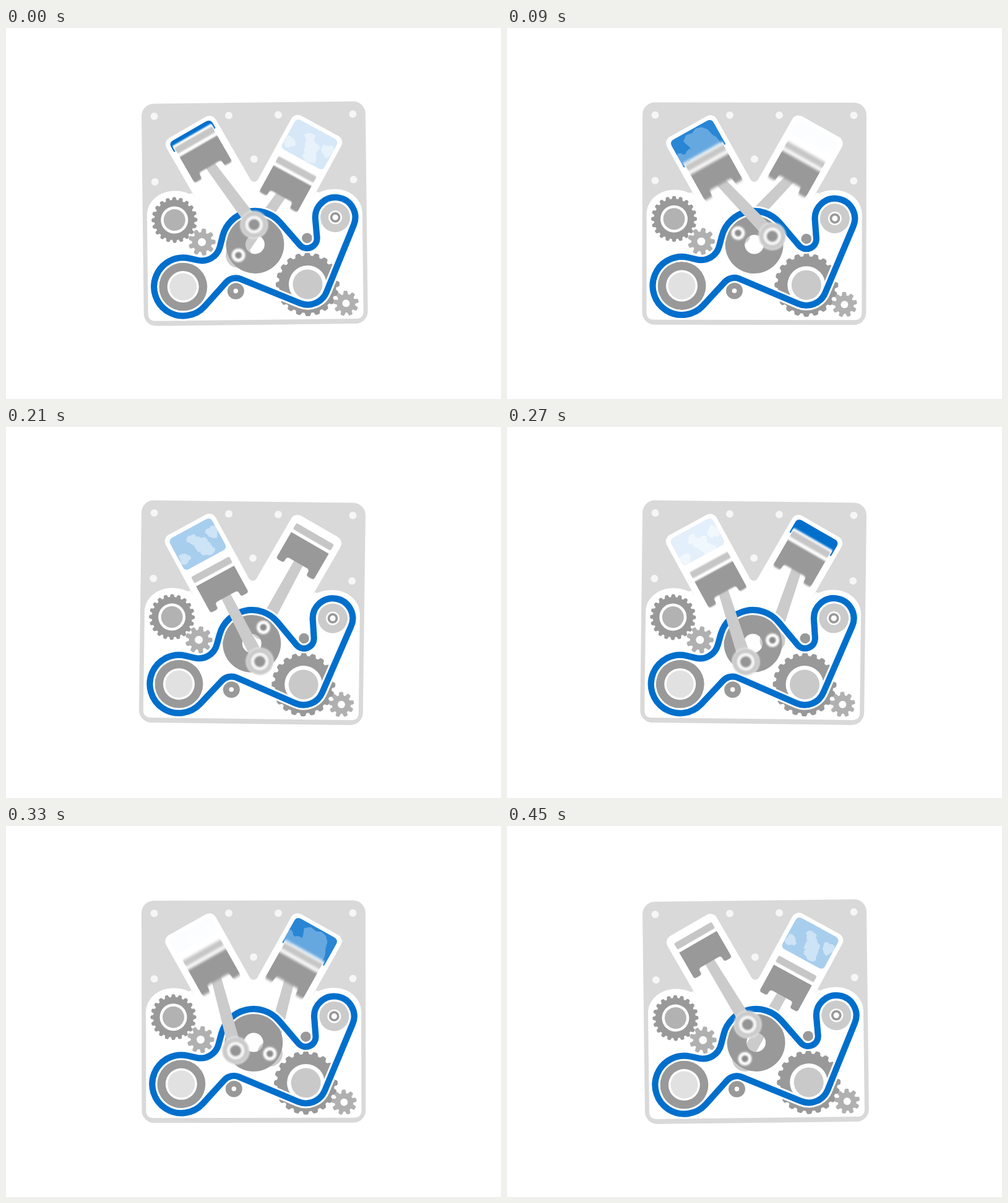
Recreate the animation shown at these times as an HTML page. Size 800 px wide and 600 px high, loop 0.48 s.

```html
<!DOCTYPE html>
<html lang="en">
<head>
<meta charset="utf-8">
<title>Engine</title>
<style>
html, body { margin: 0; width: 100%; height: 100%; overflow: hidden; background: #fff; }
svg { display: block; width: 800px; height: 600px; }
</style>
</head>
<body>
<svg viewBox="0 0 800 600" xmlns="http://www.w3.org/2000/svg">
  <defs>
    <filter id="blurL" filterUnits="userSpaceOnUse" x="-60" y="-20" width="120" height="110"><feGaussianBlur stdDeviation="0 1"/></filter>
    <filter id="blurR" filterUnits="userSpaceOnUse" x="-60" y="-20" width="120" height="110"><feGaussianBlur stdDeviation="0 1"/></filter>
    <filter id="soft" filterUnits="userSpaceOnUse" x="-40" y="-40" width="80" height="80"><feGaussianBlur stdDeviation="1.3"/></filter>
    <clipPath id="clipL"><path/></clipPath>
    <clipPath id="clipR"><path/></clipPath>
    <g id="piston">
      <rect x="-36.5" y="-3" width="73" height="21" rx="2" fill="#fff"/>
      <rect x="-35" y="1" width="70" height="11.5" rx="2" fill="#c6c6c6"/>
      <path fill="#999" d="M-35 18H35V63Q35 67 31 67H25Q21 67 21 63V61Q21 56 16 56H-16Q-21 56 -21 61V63Q-21 67 -25 67H-31Q-35 67 -35 63Z"/>
    </g>
    <path id="shoulder" d="M226 310V301C226 279 246 262 270 262C281 262 288 264 293.5 266.5Q297 268 299 265.5L330 310Z"/>
  </defs>
  <g id="engine">
    <rect x="219" y="120.5" width="362" height="359.5" rx="20" fill="#d9d9d9"/>
    <g id="holes" fill="#f6f6f6"></g>
    <g fill="#fff">
      <use href="#shoulder"/>
      <use href="#shoulder" transform="matrix(-1 0 0 1 800 0)"/>
      <path d="M226 300H574V460Q574 472 562 472H238Q226 472 226 460Z"/>
      <rect x="-46" y="-218.5" width="92" height="180" rx="12" transform="translate(400 350) rotate(-29.3)"/>
      <rect x="-46" y="-218.5" width="92" height="180" rx="12" transform="translate(400 350) rotate(29.3)"/>
      <rect x="393.9" y="245.1" width="12.2" height="28"/>
      <circle cx="400" cy="241.7" r="7" fill="#d9d9d9"/>
    </g>
    <g id="gears"></g>
    <g id="wheels"></g>
    <g id="rodR" fill="#cbcbcb"><path/><circle r="20.5"/></g>
    <path fill="#999" fill-rule="evenodd" d="M353 350a47 47 0 1 0 94 0a47 47 0 1 0 -94 0M384.5 350a15.5 15.5 0 1 0 31 0a15.5 15.5 0 1 0 -31 0"/>
    <g id="pinR">
      <g filter="url(#soft)">
        <circle r="11.5" fill="#d6d6d6"/>
        <circle r="8" fill="none" stroke="#fff" stroke-width="4"/>
        <circle r="5.5" fill="#8c8c8c"/>
      </g>
    </g>
    <path id="edge" fill="none" stroke="#fff" stroke-width="16"/>
    <path id="belt" fill="none" stroke="#006fcc" stroke-width="10.2"/>
    <g id="rodL" fill="#cbcbcb"><path/></g>
    <g id="pinL">
      <g filter="url(#soft)">
        <circle r="22" fill="#cbcbcb" stroke="#fff" stroke-opacity=".45" stroke-width="2"/>
        <circle r="12.5" fill="#eee" stroke="#f8f8f8" stroke-width="3"/>
        <circle r="9" fill="#959595"/>
      </g>
    </g>
    <g transform="translate(400 350) rotate(-29.3)">
      <g id="gasL" clip-path="url(#clipL)"><path fill="#006fcc" d="M-40-214h80v180h-80z"/><path fill="#fff"/></g>
      <g id="headL"><use href="#piston" filter="url(#blurL)"/></g>
    </g>
    <g transform="translate(400 350) rotate(29.3)">
      <g id="gasR" clip-path="url(#clipR)"><path fill="#006fcc" d="M-40-214h80v180h-80z"/><path fill="#fff"/></g>
      <g id="headR"><use href="#piston" filter="url(#blurR)"/></g>
    </g>
  </g>
</svg>
<script>
const LOOP = 480, STEP = 30, RAD = Math.PI / 180;
const CX = 400, CY = 350, CRANK = 32, ROD = 129, WRIST = 45, LEAN = 29.3;
const $ = s => document.querySelector(s);
const mod = (a, n) => ((a % n) + n) % n;
const clamp = (v, a = 0, b = 1) => Math.min(b, Math.max(a, v));
const set = (el, attrs) => { for (const k in attrs) el.setAttribute(k, attrs[k]); };

function add(parent, tag, attrs) {
  const el = document.createElementNS('http://www.w3.org/2000/svg', tag);
  set(el, attrs);
  return parent.appendChild(el);
}
const disc = (parent, cx, cy, r, fill) => add(parent, 'circle', { cx, cy, r, fill });

for (const [x, y] of [[239.5, 141], [360, 141], [440, 141], [560.5, 141], [400, 212], [239.5, 247], [560.5, 247]])
  add($('#holes'), 'circle', { cx: x, cy: y, r: 6 });

// Toothed wheel outline centred on the origin
function teeth(n, root, tip) {
  const pts = [];
  for (let i = 0; i < n; i++)
    for (const [f, r] of [[-.37, root], [-.24, tip - 1], [-.15, tip], [.15, tip], [.24, tip - 1], [.37, root]]) {
      const a = (i + f) * 2 * Math.PI / n;
      pts.push((r * Math.cos(a)).toFixed(2) + ' ' + (r * Math.sin(a)).toFixed(2));
    }
  return 'M' + pts.join('L') + 'Z';
}

for (const [x, y, n, root, tip, fill, turn] of [
  [270.3, 309, 20, 32.5, 37, '#999', 0],
  [314.3, 345.3, 9, 16, 22, '#b0b0b0', 0],
  [484.3, 415.5, 20, 46.5, 51.5, '#999', 0],
  [546, 447, 9, 15, 20.5, '#b0b0b0', -12]
]) add($('#gears'), 'path', { d: teeth(n, root, tip), fill, transform: `translate(${x} ${y}) rotate(${turn})` });

[
  [270.3, 309, 22, '#fff'], [270.3, 309, 17.5, '#b2b2b2'],
  [314.3, 345.3, 6.5, '#fff'],
  [484.3, 415.5, 30.5, '#fff'], [484.3, 415.5, 24, '#c9c9c9'],
  [546, 447, 6, '#fff'],
  [283, 417.2, 39, '#999'], [283, 417.2, 25.5, '#fff'], [283, 417.2, 22, '#e1e1e1'],
  [530.2, 307.8, 24, '#cbcbcb'], [530.2, 307.8, 11, '#fff'], [530.2, 307.8, 8.4, '#999'], [530.2, 307.8, 4.6, '#fff'],
  [484.3, 341, 8.5, '#999'],
  [368, 425, 13.5, '#999'], [368, 425, 3.8, '#fff']
].forEach(c => disc($('#wheels'), ...c));

// Belt: tangent lines between wheels; a negative radius wraps the other way round
function beltPath(ws) {
  const m = ws.length, out = [], into = [];
  ws.forEach(([x, y, s], i) => {
    const j = (i + 1) % m, [X, Y, S] = ws[j];
    const dx = X - x, dy = Y - y;
    const nu = Math.atan2(dy, dx) - Math.acos(clamp((s - S) / Math.hypot(dx, dy), -1, 1));
    const at = (cx, cy, r) => ({ x: cx + r * Math.cos(nu), y: cy + r * Math.sin(nu), a: nu });
    out[i] = at(x, y, s);
    into[j] = at(X, Y, S);
  });
  let d = `M${into[0].x} ${into[0].y}`;
  ws.forEach(([, , s], i) => {
    const span = mod((out[i].a - into[i].a) * Math.sign(s), 2 * Math.PI);
    const r = Math.abs(s), next = into[(i + 1) % m];
    d += `A${r} ${r} 0 ${span > Math.PI ? 1 : 0} ${s > 0 ? 1 : 0} ${out[i].x} ${out[i].y}L${next.x} ${next.y}`;
  });
  return d + 'Z';
}
const route = beltPath([
  [283, 417.2, 47], [314.3, 345.3, -30], [400, 350, 54], [484.3, 341, -16],
  [530.2, 307.8, 32.3], [484.3, 415.5, 33], [368, 425, -21]
]);
set($('#belt'), { d: route });
set($('#edge'), { d: route });

// Sway of the block, evenly spaced keys starting at 30 ms
const sway = [.75, -.15, -.85, -1.05, -.97, .1, .65, 1];
function swayAt(t) {
  const u = mod(t - 30, LOOP) / 60, i = Math.floor(u), f = u - i;
  const [a, b, c, d] = [-1, 0, 1, 2].map(k => sway[mod(i + k, 8)]);
  return b + f / 2 * (c - a + f * (2 * a - 5 * b + 4 * c - d + f * (3 * (b - c) + d - a)));
}

function ramp(keys, u) {
  for (let i = 1; i < keys.length; i++) {
    const [a, v] = keys[i - 1], [b, w] = keys[i];
    if (u <= b) return v + (w - v) * (u - a) / (b - a);
  }
  return keys[keys.length - 1][1];
}
const gasKeys = [[0, 1], [60, 1], [90, .84], [150, .6], [210, .34], [240, .16], [270, .11], [330, .015], [360, 0]];
const cloudKeys = [[0, 0], [60, 0], [90, .28], [150, .27], [210, .42], [270, .45]];

const clouds = [
  [[4, 190, 21], [16, 175, 18], [-34, 177, 10], [-14, 173, 14]],
  [[-34, 194, 9], [-9, 166, 15], [8, 161, 12], [9, 195, 6], [34, 182, 9]],
  [[4, 182, 12], [-5, 194, 8], [10, 168, 11], [-30, 172, 9], [30, 189, 10]]
];
function blob([x, y, r], k) {
  const pts = [];
  for (let i = 0; i < 14; i++) {
    const a = i / 14 * 2 * Math.PI;
    const q = r * (1 + .16 * Math.sin(3 * a + k * 2.1) + .1 * Math.sin(5 * a + k));
    pts.push((x + q * Math.cos(a)).toFixed(1) + ' ' + (-y + q * Math.sin(a)).toFixed(1));
  }
  return 'M' + pts.join('L') + 'Z';
}

// Height of a piston crown above the crank centre
function crown(pin, axis) {
  const p = (pin - axis) * RAD;
  return CRANK * Math.cos(p) + Math.sqrt(ROD * ROD - (CRANK * Math.sin(p)) ** 2) + WRIST;
}

// The gas first wraps round the crown, then lifts off it
function gasShape(top, u) {
  const s = clamp((u - 60) / 110), gap = -7 + 19 * s * s * (3 - 2 * s);
  const y = -(top + gap), r = clamp(gap - 2, 2, 8);
  return `M-39 ${y - r}V-203Q-39-212 -30-212H30Q39-212 39-203V${y - r}Q39 ${y} ${39 - r} ${y}H${r - 39}Q-39 ${y} -39 ${y - r}Z`;
}

function drawSide(id, side, pin, u) {
  const axis = -90 + side * LEAN, top = crown(pin, axis);
  const speed = Math.abs(crown(pin + 1, axis) - crown(pin - 1, axis)) / 2;
  const px = CX + CRANK * Math.cos(pin * RAD), py = CY + CRANK * Math.sin(pin * RAD);
  const wx = CX + (top - WRIST) * Math.cos(axis * RAD), wy = CY + (top - WRIST) * Math.sin(axis * RAD);
  const nx = -(py - wy) / ROD, ny = (px - wx) / ROD;
  set($(`#rod${id} path`), {
    d: `M${wx + 8 * nx} ${wy + 8 * ny}L${px + 10.5 * nx} ${py + 10.5 * ny}L${px - 10.5 * nx} ${py - 10.5 * ny}L${wx - 8 * nx} ${wy - 8 * ny}Z`
  });
  const end = $(`#rod${id} circle`);
  if (end) set(end, { cx: px, cy: py });
  set($('#pin' + id), { transform: `translate(${px} ${py})` });
  set($('#head' + id), { transform: `translate(0 ${-top})` });
  set($(`#blur${id} feGaussianBlur`), { stdDeviation: `0.15 ${.25 + speed * 3}` });

  set($(`#clip${id} path`), { d: gasShape(top, u) });
  const gas = $('#gas' + id);
  set(gas.children[0], { 'fill-opacity': ramp(gasKeys, u) });
  set(gas.children[1], {
    d: clouds[u < 120 ? 0 : u < 195 ? 1 : 2].map((c, k) => blob(c, k + u / 60)).join(''),
    'fill-opacity': ramp(cloudKeys, u)
  });
}

function draw(t) {
  const turn = 360 * t / LOOP;
  set($('#engine'), { transform: `rotate(${-.7 * swayAt(t)} 400 140)` });
  drawSide('R', 1, 147.5 + turn, mod(t + 240, LOOP));
  drawSide('L', -1, -92 + turn, t);
}

function tick() {
  draw(Math.floor(mod(performance.now() - start, LOOP) / STEP) * STEP);
  requestAnimationFrame(tick);
}
const start = performance.now();
draw(0);
requestAnimationFrame(tick);
</script>
</body>
</html>
```
